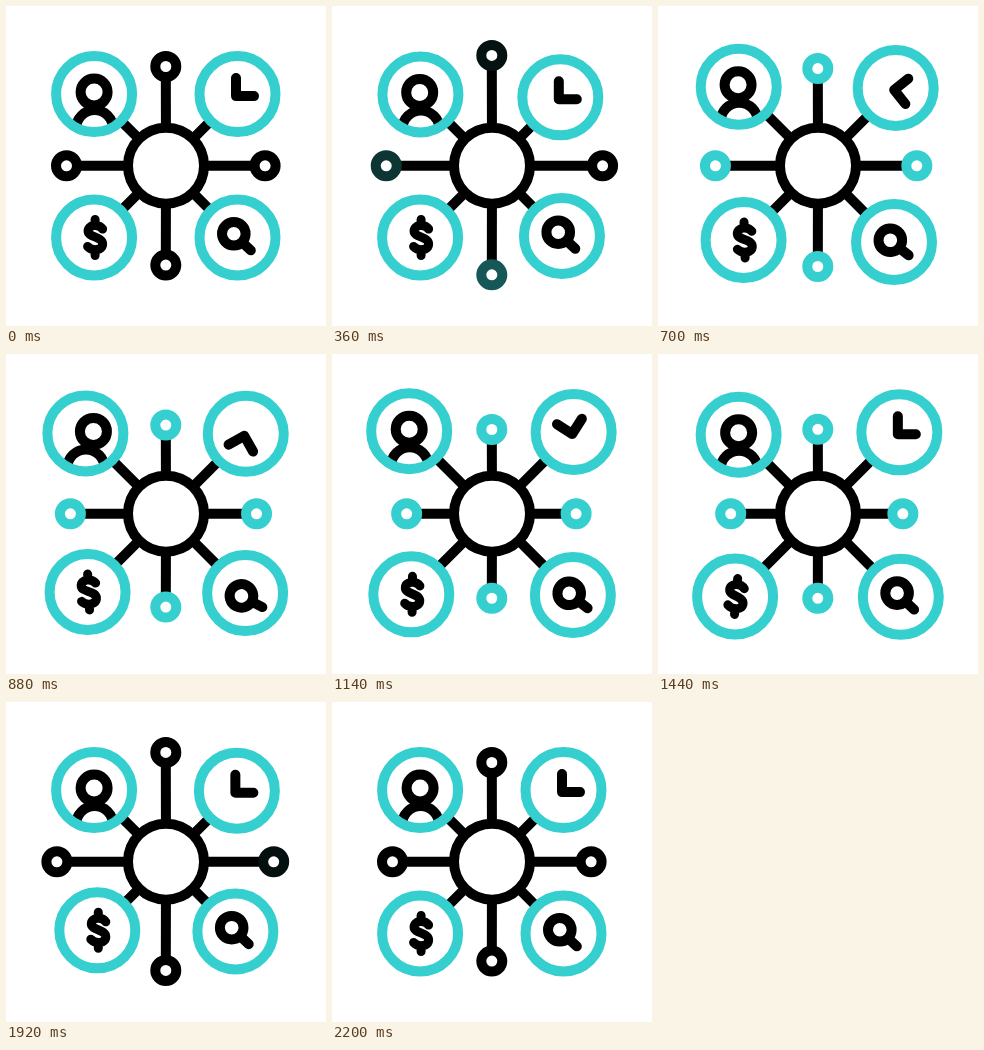
Animation of 320x320 px, one loop 2400 ms. Source, as an HTML page:

```html
<!DOCTYPE html>
<html lang="en">
<head>
<meta charset="utf-8">
<title>Network hub</title>
<style>
  html, body { margin: 0; width: 100%; height: 100%; overflow: hidden; background: #fff; }
  svg { display: block; width: 100vw; height: 100vh; }
  #stage { stroke: #000; stroke-width: 10; fill: none; stroke-linecap: round; stroke-linejoin: round; }
  .disc { fill: #fff; }
  .teal { stroke: #34cfce; }
</style>
</head>
<body>
<svg viewBox="0 0 320 320">
  <g id="stage">
    <path id="spokes"/>
    <circle class="disc" cx="160" cy="159.7" r="38"/>
    <g class="big">
      <circle class="disc" r="38" stroke="none"/>
      <path d="M-18 34.5A18.5 18.5 0 0 1 19 34.5" stroke-linecap="butt"/>
      <circle class="icon" r="13.5"/>
      <circle class="teal" r="38"/>
    </g>
    <g class="big">
      <circle class="disc teal" r="38"/>
      <path class="icon" d="M0-18V0H18"/>
    </g>
    <g class="big">
      <circle class="disc teal" r="38"/>
      <g class="icon"><circle r="11.8"/><path d="M9 9L17 16.5"/></g>
    </g>
    <g class="big">
      <circle class="disc teal" r="38"/>
      <path class="icon" stroke-width="9" d="M.5-18V-13M.5 18V13M8-8.5C4-14-7-13-6.5-6C-6 0 8-1 8 6.5C8 13-2 14-7 9"/>
    </g>
    <circle class="disc small" r="10.5"/>
    <circle class="disc small" r="10.5"/>
    <circle class="disc small" r="10.5"/>
    <circle class="disc small" r="10.5"/>
  </g>
</svg>
<script>
const LOOP = 2400;
const TEAL = [52, 207, 206];
const all = selector => [...document.querySelectorAll(selector)];
const spokes = document.getElementById('spokes');
const bigNodes = all('.big'), smallNodes = all('.small'), icons = all('.icon');

const clamp = x => Math.min(1, Math.max(0, x));
const span = (t, from, to) => clamp((t - from) / (to - from));
const ease = p => (1 - Math.cos(Math.PI * p)) / 2;

// Smooth curve through [time, value] keys that never overshoots them.
function curve(keys, t) {
  const last = keys.length - 1;
  if (t <= keys[0][0]) return keys[0][1];
  if (t >= keys[last][0]) return keys[last][1];
  const slope = i => (keys[i + 1][1] - keys[i][1]) / (keys[i + 1][0] - keys[i][0]);
  const tangent = i => {
    if (i === 0 || i === last) return 0;
    const a = slope(i - 1), b = slope(i);
    return a * b <= 0 ? 0 : 2 * a * b / (a + b);
  };
  let i = 0;
  while (t > keys[i + 1][0]) i++;
  const width = keys[i + 1][0] - keys[i][0];
  const p = (t - keys[i][0]) / width, q = 1 - p;
  return keys[i][1] * (1 + 2 * p) * q * q + keys[i + 1][1] * p * p * (3 - 2 * p)
    + width * (tangent(i) * p * q * q - tangent(i + 1) * p * p * q);
}

const delayed = (keys, delay) => keys.map(([t, v]) => [t + delay, v]);

// Clockwise from the top left; later nodes start and return later.
const bigOut = [[120, 0], [285, -3.2], [370, 0], [460, 2.5], [540, 4.5], [640, 6.5], [760, 8], [900, 8.8]];
const bigBack = [[1240, 11.3], [1340, 9.8], [1440, 7.5], [1540, -2.3], [1610, -3.2], [1740, -1.8], [1890, 0]];
const bigs = [[-1, -1], [1, -1], [1, 1], [-1, 1]].map(([dx, dy], i) => ({
  dx, dy, keys: [...delayed(bigOut, 80 * i), ...delayed(bigBack, 103 * i)]
}));

// Clockwise from the top, with the time of each return and colour change.
const smallOut = [[120, 0], [320, 11.5], [540, 4], [760, -4.5], [880, -10.5], [1080, -15]];
const smalls = [
  { dx: 0, dy: -1, back: [1420, 1840], tint: 2 },
  { dx: 1, dy: 0, back: [1400, 1780], tint: 3 },
  { dx: 0, dy: 1, back: [1420, 1810], tint: 0 },
  { dx: -1, dy: 0, back: [1340, 1820], tint: 1 }
].map((node, i) => ({ ...node, keys: delayed(smallOut, 45 * i) }));

function smallOffset({ keys, back: [start, peak] }, t) {
  if (t < start) return curve(keys, t);
  if (t < peak) return -15 + 26.5 * ease(span(t, start, peak));
  return 11.5 * (1 - ease(span(t, peak, 2200)));
}

function smallColor(order, t) {
  const on = 260 + 40 * order, off = 1520 + 60 * order;
  const amount = span(t, on, on + 240) - span(t, off, off + 240);
  return `rgb(${TEAL.map(c => Math.round(c * amount))})`;
}

function render(t) {
  let lines = '';
  const place = (el, x, y) => {
    el.setAttribute('transform', `translate(${x} ${y})`);
    lines += `M160 159.7L${x} ${y}`;
  };

  bigs.forEach(({ dx, dy, keys }, i) => {
    const reach = 71.7 + curve(keys, t);
    place(bigNodes[i], 159.8 + dx * reach, 159.8 + dy * reach);
  });
  smalls.forEach((node, i) => {
    const reach = 99.3 + smallOffset(node, t);
    place(smallNodes[i], 159.8 + node.dx * reach, 159.8 + node.dy * reach);
    smallNodes[i].style.stroke = smallColor(node.tint, t);
  });
  spokes.setAttribute('d', lines);

  const sway = curve([[320, 0], [540, -8], [880, 8], [1150, 0]], t);
  const turn = 360 * ease(span(t, 480, 1375));
  const search = curve([[600, 0], [880, 1], [1300, 0]], t);
  const tilt = curve([[480, 0], [880, -3], [1440, 5], [1800, 0]], t);
  [
    `translate(${sway} -2)`,
    `translate(-1.5 2) rotate(${turn})`,
    `translate(-3.7 ${-3.7 + 6.5 * search}) rotate(${-16 * search})`,
    `translate(.5 0) rotate(${tilt})`
  ].forEach((value, i) => icons[i].setAttribute('transform', value));
}

function tick() {
  render(performance.now() % LOOP);
  requestAnimationFrame(tick);
}
tick();
</script>
</body>
</html>
```
